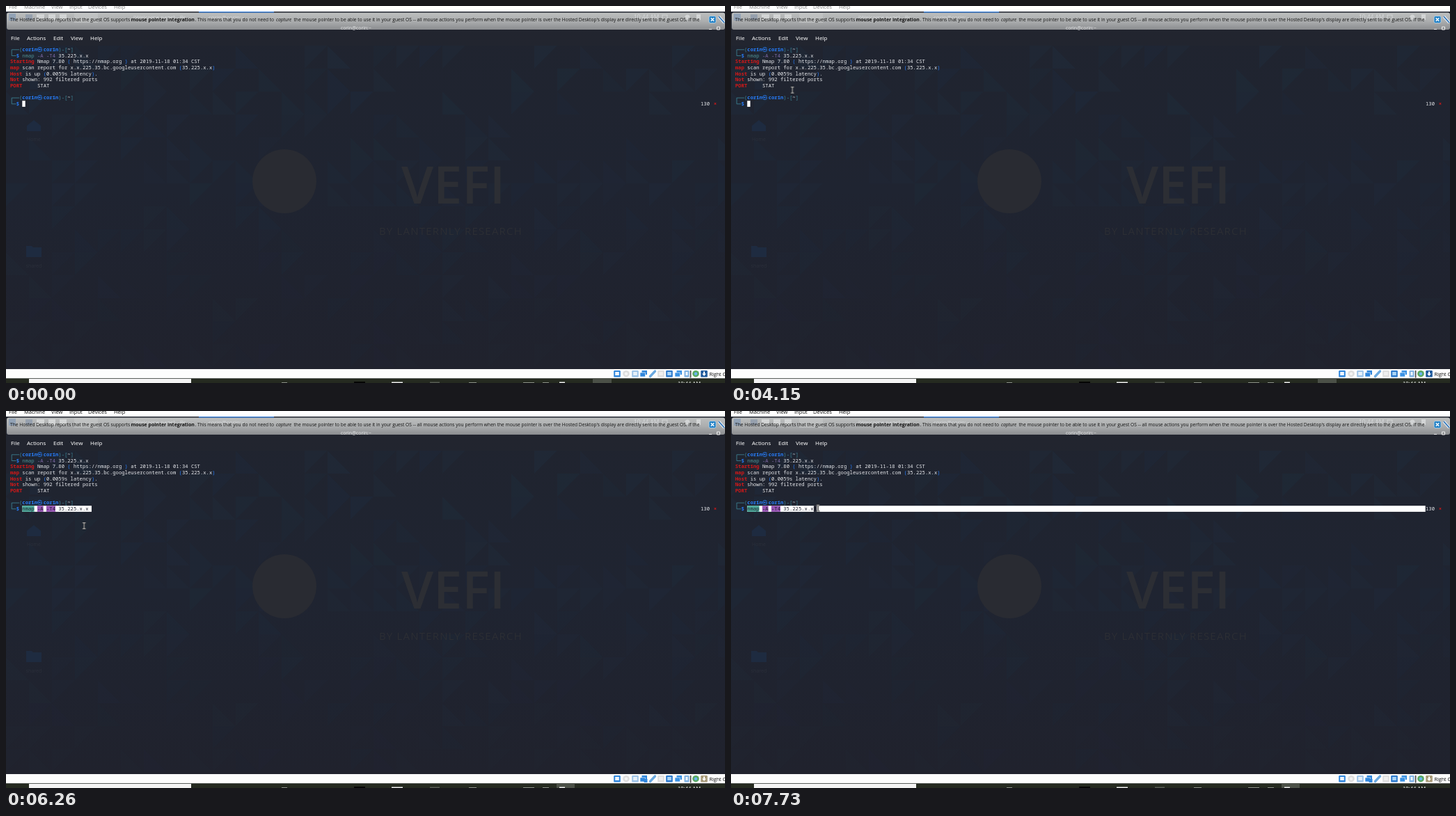
An HTML page that plays this animation: 1033x542 px, repeating every 8 s.

```html
<!DOCTYPE html>
<html lang="en">
<head>
<meta charset="utf-8">
<title>Terminal paste</title>
<style>
html, body { margin: 0; width: 100%; height: 100%; overflow: hidden; background: #20222d; }
svg { display: block; width: 1033px; height: 542px; }
text { font-family: "Open Sans", "Noto Sans", sans-serif; white-space: pre; }
.term text { font: 7.22px "Noto Sans Mono", "Noto Sans CJK KR", "Noto Sans CJK JP", "DejaVu Sans Mono", monospace; fill: #e6e8ec; }
.term .blue { fill: #277fff; }
.term .user { fill: #277fff; font-weight: 700; }
.term .red { fill: #d41919; font-weight: 700; }
.term .teal { fill: #4f8f92; }
.term .flag { fill: #7f6aa6; }
.term .edge { fill: #3f8a9c; }
.term .dark { fill: #20222e; }
.bar { font-size: 6.67px; fill: #111; }
.ghost { fill: #e4e6e8; opacity: .75; }
.ui text { font: 500 7.95px "Noto Sans", "Open Sans", sans-serif; fill: #fff; }

.menu, .hover1, .hover2, .typed, .before, .drag1, .drag2, .word, .ring, .awake, .asleep, .key, .hdd, .net, .led, .arrow, .beam, .pointer {
  animation: 8s step-end infinite;
}
.menu, .arrow { animation-name: menu; }
.beam { animation-name: beam; }
.hover1 { animation-name: hover1; }
.hover2 { animation-name: hover2; }
.typed { animation-name: typed; }
.before { animation-name: before; }
.drag1 { animation-name: drag1; }
.drag2 { animation-name: drag2; }
.word { animation-name: word; }
.ring { animation-name: ring; }
.awake { animation-name: awake; }
.asleep { animation-name: asleep; }
.key { animation-name: key; }
.hdd { animation-name: hdd; }
.net { animation-name: net; }
.led { animation-name: led; }
.pointer { animation-name: pointer; }

@keyframes menu { 0%, 68.5%, 100% { opacity: 0 } 55.875% { opacity: 1 } }
@keyframes beam { 0%, 68.5%, 100% { opacity: 1 } 55.875% { opacity: 0 } }
@keyframes hover1 { 0%, 61.625%, 100% { opacity: 0 } 60.625% { opacity: 1 } }
@keyframes hover2 { 0%, 68.5%, 100% { opacity: 0 } 61.625% { opacity: 1 } }
@keyframes typed { 0% { opacity: 0 } 68.5%, 100% { opacity: 1 } }
@keyframes before { 0% { opacity: 1 } 68.5%, 100% { opacity: 0 } }
@keyframes drag1 { 0%, 87%, 100% { opacity: 0 } 81.25% { opacity: 1 } }
@keyframes drag2 { 0%, 87%, 100% { opacity: 0 } 82.25% { opacity: 1 } }
@keyframes word { 0% { opacity: 0 } 95.6875%, 100% { opacity: 1 } }
@keyframes ring {
  0%, 56.875%, 68.5%, 82.25%, 87%, 94.75%, 96.625%, 100% { opacity: 0 }
  54%, 67.375%, 80.25%, 86%, 93.75%, 95.6875% { opacity: .8 }
}
@keyframes awake { 0% { opacity: 0 } 54%, 100% { opacity: 1 } }
@keyframes asleep { 0% { opacity: 1 } 54%, 100% { opacity: 0 } }
@keyframes key { 0% { fill: #1f5a9c } 55.875%, 100% { fill: #a79a78 } }
@keyframes hdd { 0%, 74.25%, 100% { opacity: 0 } 73.25% { opacity: 1 } }
@keyframes net { 0% { opacity: 0 } 58.75%, 100% { opacity: 1 } }
@keyframes led { 0% { opacity: 1 } 21.875%, 100% { opacity: 0 } }
@keyframes pointer {
  0% { transform: translate(-50px, -50px) }
  3.625% { transform: translate(998px, 538px); animation-timing-function: steps(6, end) }
  9.25% { transform: translate(121.5px, 59px) }
  44.25% { transform: translate(118px, 62px); animation-timing-function: steps(10, end) }
  54% { transform: translate(75.5px, 146px) }
  60.625% { transform: translate(92px, 160px) }
  61.625% { transform: translate(105.5px, 177.3px) }
  76.375% { transform: translate(109px, 170px); animation-timing-function: steps(4, end) }
  80.25% { transform: translate(122px, 150px); animation-timing-function: steps(2, end) }
  82.25%, 100% { transform: translate(125px, 139.6px) }
}
</style>
</head>
<body>
<svg viewBox="0 0 1033 542" xmlns="http://www.w3.org/2000/svg">
  <defs>
    <linearGradient id="notice" x2="0" y2="1">
      <stop stop-color="#bcbebe"/><stop offset=".5" stop-color="#acaeaf"/><stop offset="1" stop-color="#8b8d90"/>
    </linearGradient>
    <linearGradient id="night" x2="0" y2="1">
      <stop stop-color="#20242f"/><stop offset=".5" stop-color="#1f2431"/><stop offset="1" stop-color="#20222d"/>
    </linearGradient>
  </defs>

  <!-- wallpaper seen through the terminal -->
  <rect y="8" width="1033" height="514" fill="url(#night)"/>
  <g id="tiles" fill="#1d3a52"></g>
  <circle cx="400" cy="252" r="46" fill="#292b32"/>
  <g fill="#2c2e34">
    <text x="568" y="284" font-size="74" font-weight="600">VEFI</text>
    <text x="536" y="329" font-size="15" letter-spacing="1.2">BY LANTERNLY RESEARCH</text>
  </g>
  <g fill="#1e2b40">
    <path d="M30 172l10-8 10 8v8h-20z"/>
    <path d="M29 345h8l2 2h12v14h-22z"/>
    <path d="M34 108h12v12h-12z" opacity=".4"/>
  </g>
  <g fill="#2b303b" font-size="7" text-anchor="middle">
    <text x="40" y="194">Home</text><text x="40" y="376">shared</text>
  </g>
  <rect y="34" width="1033" height="23" fill="#23252f" opacity=".7"/>

  <!-- host menu and notice bar -->
  <rect width="1033" height="8" fill="#fff"/>
  <g id="host"></g>
  <rect x="1" y="9.5" width="1032" height="24.5" rx="3" fill="url(#notice)"/>
  <rect x="277" y="8" width="108" height="1.5" fill="#3b7fd4"/>
  <g opacity=".55">
    <rect x="98" y="10" width="34" height="14" fill="#c9cbcb"/>
    <rect x="4" y="11" width="10" height="10" fill="#7591b4"/>
    <rect x="28" y="12" width="10" height="8" fill="#7d8ea6"/>
    <g fill="#eceeee">
      <rect x="44" y="12" width="11" height="8"/><rect x="61" y="12" width="10" height="8"/><rect x="77" y="12" width="10" height="8"/>
      <circle cx="979" cy="16" r="3.5"/><rect x="992" y="12" width="6" height="8"/>
    </g>
    <rect x="943" y="13" width="7" height="6" fill="none" stroke="#eceeee"/>
  </g>
  <g class="ghost" font-size="8">
    <text x="183" y="19">[Welcome page] - Br…</text>
    <text x="291" y="19">corin@corin:~</text>
    <text x="902" y="19" font-size="8.4">10:44 AM</text>
  </g>
  <text x="481" y="34" font-size="6.8" fill="#e9eaec">corin@corin:~</text>
  <path d="M1010 33.5h4M1021.5 30h4v4h-4z" fill="none" stroke="#eee"/>
  <g class="bar">
    <text x="6" y="22.4">The Hosted Desktop reports that the guest OS supports</text>
    <text x="179.5" y="22.4" font-size="6.95" font-weight="700">mouse pointer integration</text>
    <text x="271.5" y="22.4">. This means that you do not need to</text>
    <text x="388" y="22.4" font-style="italic">capture</text>
    <text x="413.5" y="22.4">the mouse pointer to be able to use it in your guest OS -- all mouse actions you perform when the mouse pointer is over the Hosted Desktop's display are directly sent to the guest OS. If the</text>
  </g>
  <rect x="1010" y="14.5" width="10" height="10" rx="2" fill="#2482c6" stroke="#b9d6ea" stroke-width=".8"/>
  <path d="M1012.8 17.300l4.400 4.400M1017.200 17.300l-4.400 4.400" stroke="#fff" stroke-width="1.5"/>
  <path d="M1024 15l8 9" stroke="#e6eef5" stroke-width="4"/>
  <path d="M1024 15l8 9" stroke="#2b70b5" stroke-width="1.6"/>

  <g class="ui" id="appMenu"></g>

  <g class="term">
    <path d="M19 62.800H8.200V71.500H14.600M19 132.100H8.200V140.800H14.600" fill="none" stroke="#3f8a9c" stroke-width=".8"/>
    <g id="lines"></g>
    <rect class="before" x="23.300" y="136.200" width="4.400" height="8.700" fill="#fff"/>
    <g class="typed" id="typed"></g>
    <g class="drag1"><rect x="6" y="144.900" width="117" height="8.700" fill="#fff"/></g>
    <g class="drag2" id="drag"></g>
    <g class="word">
      <rect x="118.900" y="136.200" width="4.300" height="8.700" fill="#20222e"/>
      <rect x="123.200" y="136.200" width="874.500" height="8.700" fill="#fff"/>
    </g>
  </g>

  <g class="ui menu">
    <rect x="76" y="146" width="196" height="209" fill="#23252f"/>
    <rect class="hover1" x="76" y="146" width="196" height="15.600" fill="#277fff"/>
    <rect class="hover2" x="76" y="161.500" width="196" height="15.600" fill="#277fff"/>
    <path d="M79 244.500h190M79 318h190" stroke="#1b1d25" stroke-width="1"/>
    <g id="items"></g>
  </g>

  <!-- host status bar and taskbar -->
  <rect y="522" width="1033" height="13.5" fill="#fdfdfd"/>
  <g id="status"></g>
  <text x="1010.500" y="532" font-size="7.200" fill="#111">Right Ctrl</text>
  <rect y="535.500" width="1033" height="7" fill="#252a20"/>
  <rect x="33" y="536" width="233" height="6" fill="#f4f4f4"/>
  <rect class="asleep" x="843" y="535.500" width="27" height="7" fill="#4b5047"/>
  <rect class="awake" x="791" y="535.500" width="26" height="7" fill="#4b5047"/>
  <g fill="#8b9088">
    <rect x="396" y="541" width="8" height="1"/><rect x="500" y="540" width="16" height="2" fill="#050505"/>
    <rect x="554" y="540.500" width="16" height="2" fill="#eee"/><rect x="609" y="540.500" width="14" height="2" opacity=".5"/>
    <rect x="665" y="541" width="11" height="1"/><rect x="743" y="541" width="16" height="1"/>
    <rect x="771" y="541" width="9" height="1"/><rect x="795" y="540.500" width="8" height="2" fill="#eee"/>
  </g>
  <text x="965" y="545.300" font-size="7.600" fill="#fff">10:44 AM</text>

  <g class="pointer">
    <circle class="ring" r="8.300" fill="#c0b41e"/>
    <g class="beam" fill="none">
      <path d="M-2.300-4.200H2.300M0-4.200V4.200M-2.300 4.200H2.300" stroke="#111" stroke-width="2"/>
      <path d="M-2.300-4.200H2.300M0-4.200V4.200M-2.300 4.200H2.300" stroke="#e8e8e8" stroke-width=".9"/>
    </g>
    <path class="arrow" d="M0 0V9l2.200-2 1.500 3.200 1.500-.7-1.500-3.100h3z" fill="#17181c" stroke="#d8d8d8" stroke-width=".6"/>
  </g>
</svg>
<script>
const NS = "http://www.w3.org/2000/svg";
const CELL = 4.332, PITCH = 8.67;

function add(parent, tag, attrs, text) {
  const el = document.createElementNS(NS, tag);
  for (const k in attrs) el.setAttribute(k, attrs[k]);
  if (text) el.textContent = text;
  document.getElementById(parent).append(el);
}
const label = (parent, x, y, text, extra) => add(parent, "text", { x, y, ...extra }, text);
const cells = (parent, col, row, text, cls = "") =>
  label(parent, 6 + col * CELL, 65.1 + row * PITCH, text, { class: cls });
const block = (parent, from, to, fill) =>
  add(parent, "rect", { x: 6 + from * CELL, y: 136.2, width: (to - from) * CELL, height: 8.7, fill });

// Faint triangles, fixed by a sine hash
const noise = n => { const v = Math.sin(n * 127.1) * 43758.5453; return v - Math.floor(v); };
const TILE = 33, COLS = 32, ROWS = 14;
for (let i = 0; i < COLS * ROWS; i++) {
  const x = i % COLS * TILE, y = 57 + Math.floor(i / COLS) * TILE, a = noise(i + 1);
  if (a < .5) continue;
  const shape = noise(i + 600) < .5 ? `h${TILE}l-${TILE} ${TILE}z` : `v${TILE}h${TILE}z`;
  add("tiles", "path", { d: `M${x} ${y}${shape}`, opacity: (a * .2 * (1 - y / 650)).toFixed(3) });
}

const hostMenu = [["File", 4], ["Machine", 26], ["View", 65], ["Input", 91], ["Devices", 118], ["Help", 155]];
for (const [word, x] of hostMenu) {
  label("host", x, 4.4, word, { "font-size": 7.6, fill: "#858585", class: "asleep" });
  label("host", x, 4.4, word, { "font-size": 7.6, fill: "#111", class: "awake" });
}
for (const [word, x] of [["File", 7], ["Actions", 30], ["Edit", 68], ["View", 93], ["Help", 121]])
  label("appMenu", x, 49.2, word);

function prompt(row) {
  cells("lines", 3, row, "(", "edge");
  cells("lines", 4, row, "corin", "user");
  cells("lines", 9, row, "㉿", "user");
  cells("lines", 11, row, "corin", "user");
  cells("lines", 16, row, ")-[", "edge");
  cells("lines", 19, row, "~");
  cells("lines", 20, row, "]", "edge");
  cells("lines", 2, row + 1, "$", "user");
}
prompt(0);
prompt(8);
[
  [4, 1, "nmap", "teal"], [9, 1, "-A", "flag"], [12, 1, "-T4", "flag"], [16, 1, "35.225.x.x"],
  [0, 2, "Starting", "red"], [9, 2, "Nmap 7.80"], [19, 2, "(", "blue"], [21, 2, "https://nmap.org"],
  [38, 2, ")", "blue"], [40, 2, "at 2019-11-18 01:34 CST"],
  [0, 3, "map", "red"], [4, 3, "scan report for x.x.225.35.bc.googleusercontent.com"],
  [56, 3, "(", "blue"], [57, 3, "35.225.x.x"], [67, 3, ")", "blue"],
  [0, 4, "Host", "red"], [5, 4, "is up"], [11, 4, "(", "blue"], [12, 4, "0.0059s latency"], [27, 4, ")", "blue"], [28, 4, "."],
  [0, 5, "Not", "red"], [4, 5, "shown: 992 filtered ports"],
  [0, 6, "PORT", "red"], [9, 6, "STAT"],
  [229, 9, "130"], [233.3, 9, "×", "red"]
].forEach(line => cells("lines", ...line));

block("typed", 4, 27, "#fff");
block("typed", 4, 8, "#4aa698");
block("typed", 9, 11, "#9755b3");
block("typed", 12, 15, "#9755b3");
cells("typed", 4, 9, "nmap -A -T4 35.225.x.x", "dark");

block("drag", 27, 235, "#fff");
block("drag", 233, 234.1, "#c41616");
cells("drag", 229, 9, "130", "dark");

const items = [
  ["Copy Selection", "Ctrl+Shift+C", 153.5], ["Paste Clipboard", "Ctrl+Shift+V", 169.2],
  ["Paste Selection", "Shift+Ins", 185], ["Zoom in", "Ctrl++", 200.7],
  ["Zoom out", "Ctrl+-", 216.3], ["Zoom reset", "Ctrl+0", 232],
  ["Clear Active Terminal", "Ctrl+Shift+X", 258.5], ["Split Terminal Horizontally", "", 274.2],
  ["Split Terminal Vertically", "", 290], ["Collapse Subterminal", "", 305.6],
  ["Toggle Menu", "Ctrl+Shift+M", 332.3], ["Preferences...", "", 348]
];
items.forEach(([name, keys, y], i) => {
  label("items", 90, y + 2.8, name);
  label("items", 266, y + 2.8, keys, { "text-anchor": "end" });
  if (i > 6) return;
  const solid = i > 2 && i < 6;
  add("items", "rect", { x: 81, y: y - 2, width: 3.6, height: 4, fill: solid ? "#ddd" : "none", stroke: "#ddd", "stroke-width": .7 });
  if (solid) add("items", "path", { d: `M81.800 ${y}h2`, stroke: "#23252f", "stroke-width": 1 });
});

// Status icons: [centre, body colour, inner colour]
const icons = [
  [878, "#2f86dc", "#eef5ff"], [891, "#dedede", "#f4f4f4"], [904, "#9cc3e8", "#e6f0f9"], [916, "#2f86dc", "#8fc8f5"],
  [929, "#6aa9e0", "#dfeaf5"], [941, "#dedede", "#efefef"], [953, "#2a78cc", "#a9d4f6"], [966, "#3a92e4", "#2a78cc"],
  [978, "#7fb2e2", "#f0f6fc"], [991, "#58a862", "#6ab4f0"], [1003, "#1f5a9c", "#fff"]
];
icons.forEach(([x, body, inner], i) => {
  const last = i === icons.length - 1;
  if (i === 1 || i === 9) {
    add("status", "circle", { cx: x, cy: 528.7, r: 4.8, fill: body });
    add("status", "circle", { cx: x, cy: 528.7, r: 2.2, fill: inner });
  } else if (i === 4) {
    add("status", "path", { d: `M${x - 3.5} 532.500l7-7.500`, stroke: body, "stroke-width": 3.4, "stroke-linecap": "round" });
  } else if (i === 3 || i === 7) {
    add("status", "rect", { x: x - 2.5, y: 524, width: 7.5, height: 6, fill: body });
    add("status", "rect", { x: x - 5, y: 527, width: 7.5, height: 6, fill: body, stroke: "#fff", "stroke-width": .6 });
  } else {
    const w = i === 8 ? 7 : 9.6;
    add("status", "rect", { x: x - w / 2, y: 524, width: w, height: 9.6, rx: 1.2, fill: body, class: last ? "key" : "" });
    if (last) add("status", "path", { d: `M${x - 1} 525.500h2v3h2l-3 3.500-3-3.500h2z`, fill: inner });
    else add("status", "rect", { x: x - w / 2 + 2, y: 526, width: w - 4, height: 5, fill: inner });
  }
});
add("status", "rect", { x: 982.8, y: 524, width: 1.6, height: 10.5, fill: "#444" });
add("status", "rect", { x: 879, y: 529.5, width: 5, height: 5, fill: "#5fc04a", class: "hdd" });
add("status", "rect", { x: 916.5, y: 529, width: 5, height: 5, fill: "#2f86dc", class: "net" });
add("status", "rect", { x: 982.3, y: 533, width: 1.5, height: 1.2, fill: "#777", class: "led" });
</script>
</body>
</html>
```
